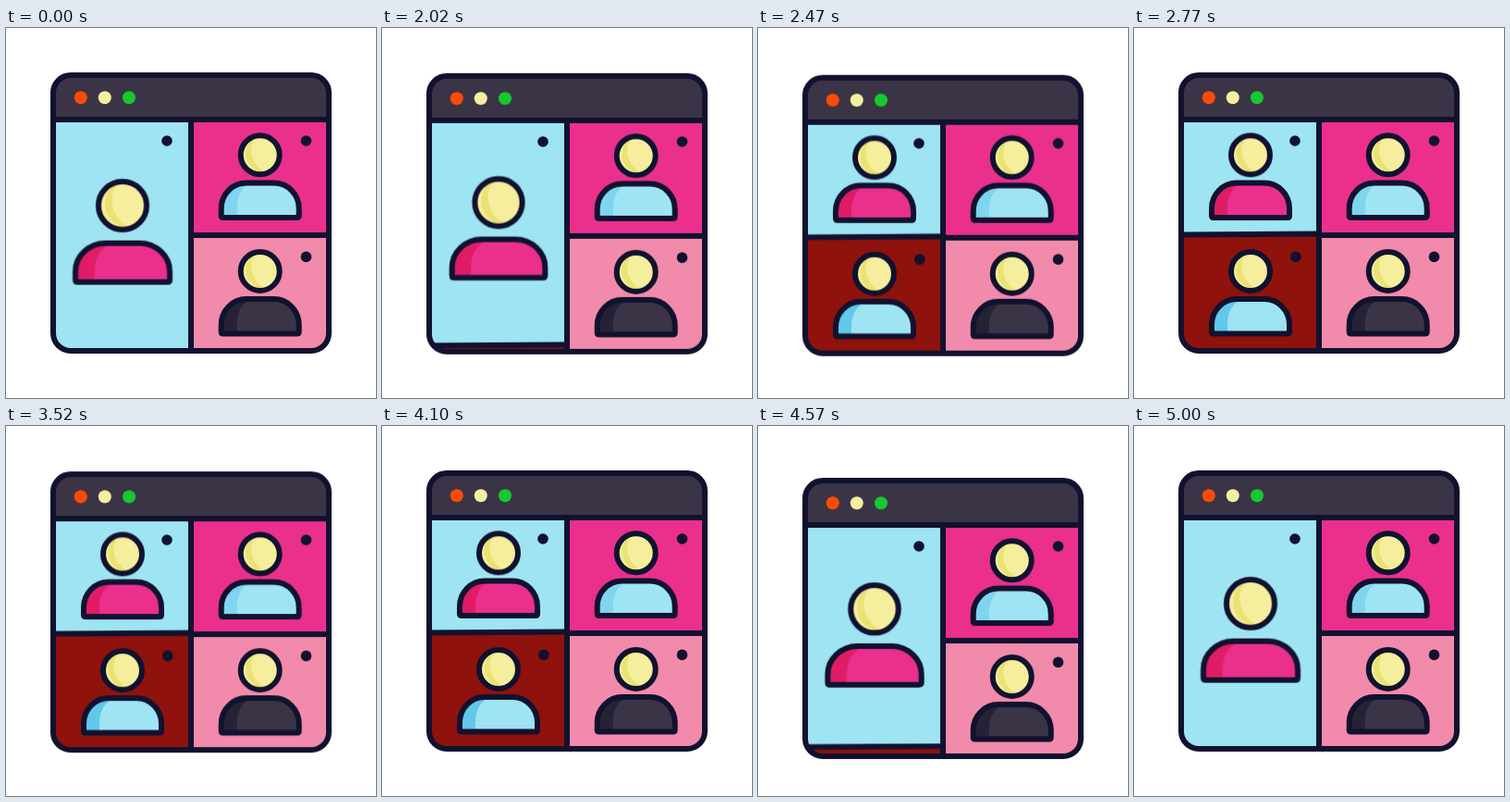
Write an HTML page that moves like this. It is 400x400 px and loops after 5020 ms.

```html
<!DOCTYPE html>
<html lang="en">
<head>
<meta charset="utf-8">
<title>Video call</title>
<style>
  html, body { margin: 0; width: 100%; height: 100%; overflow: hidden; background: #fff; }
  svg { display: block; width: 100vw; height: 100vh; }

  .line { fill: none; stroke: #10122f; stroke-width: 6; stroke-linecap: round; stroke-linejoin: round; vector-effect: non-scaling-stroke; }
  .cam { fill: #10122f; }
  .top { --c: #ea2f8c; --s: #e01c66; }
  .sky { --c: #9ee4f3; --s: #7fd5f0; }
  .low { --c: #9ee4f3; --s: #62c8ea; }
  .ink { --c: #3a3446; --s: #252236; }

  .window { animation: bob 5020ms infinite; }
  .move { animation: swap 5020ms infinite; }
  .slide { animation: slide 5020ms infinite; }
  .head { --off: translate(126px, 192px) scale(1.24); --on: translate(126px, 137.3px) scale(1); }
  .body { --off: translate(126px, 274.5px) scale(1.215, 1.12); --on: translate(126px, 205px) scale(1); }
  .panel { --off: translateY(129px); --on: translateY(0); }
  .guest { --off: translateY(160px); --on: translateY(0); }

  /* dip and return, a faint bob, then the dip again */
  @keyframes bob {
    0%, 39.84%, 84.26% { transform: translateY(0); animation-timing-function: cubic-bezier(.3, .1, .4, 1); }
    44.22%, 88.65% { transform: translateY(13px); animation-timing-function: cubic-bezier(.25, .1, .2, 1); }
    54.98%, 57.77% { transform: translateY(0); animation-timing-function: ease-in; }
    68.13% { transform: translateY(.6px); animation-timing-function: ease-in-out; }
    73.5% { transform: translateY(2.6px); animation-timing-function: ease-in-out; }
    81.67% { transform: translateY(0); }
    99.4%, 100% { transform: translateY(0); }
  }
  @keyframes swap {
    0%, 39.84% { transform: var(--off); animation-timing-function: cubic-bezier(.25, .4, .2, 1); }
    49.4%, 84.26% { transform: var(--on); animation-timing-function: cubic-bezier(.25, .4, .2, 1); }
    94.22%, 100% { transform: var(--off); }
  }
  @keyframes slide {
    0%, 39.84% { transform: var(--off); animation-timing-function: cubic-bezier(.25, .4, .2, 1); }
    49.4%, 84.26% { transform: var(--on); animation-timing-function: cubic-bezier(.25, .4, .2, 1); }
    97%, 100% { transform: var(--off); }
  }
</style>
</head>
<body>
<svg viewBox="0 0 400 400">
  <defs>
    <clipPath id="frame"><rect x="51" y="51" width="298" height="298" rx="19"/></clipPath>
    <g id="head">
      <circle r="21" fill="#f5ee9c"/>
      <path d="M-2-21A21 21 0 0 0 8 19.4C-9 14-16-10-2-21Z" fill="#eae272"/>
      <circle r="21" class="line"/>
    </g>
    <path id="bust" d="M-42-2V-10C-42-25-30-37.5-15-37.5H15C30-37.5 42-25 42-10V-2Q42 0 40 0H-40Q-42 0-42-2Z"/>
    <g id="body">
      <use href="#bust" style="fill: var(--c)"/>
      <path d="M-41 0L-42-2V-10C-42-25-30-37.5-15-37.5H-9C-20-33-25-23-25-10V0Z" style="fill: var(--s)"/>
      <path class="line" d="M-42-2V-10C-42-25-30-37.5-15-37.5H15C30-37.5 42-25 42-10V-2Q42 0 40 0H-40Q-42 0-42-2Z"/>
    </g>
    <g id="person">
      <use href="#head" y="137.3"/>
      <use href="#body" y="205"/>
    </g>
  </defs>

  <g class="window">
    <g clip-path="url(#frame)">
      <path d="M51 51H349V99H51Z" fill="#3a3446"/>
      <path d="M51 99H200V349H51Z" fill="#9ee4f3"/>
      <circle class="cam" cx="174" cy="122" r="5.8"/>
      <g class="top">
        <use href="#head" class="move head"/>
        <use href="#body" class="move body"/>
      </g>

      <g class="slide panel">
        <path d="M51 223H200V360H51Z" fill="#8f120c"/>
        <path class="line" d="M51 223.6L200 222.6"/>
      </g>
      <g class="slide guest low">
        <circle class="cam" cx="174.8" cy="247.4" r="5.8"/>
        <use href="#person" x="126" y="125.6"/>
      </g>

      <path d="M200 99H349V224H200Z" fill="#ea2f8c"/>
      <path d="M200 224H349V349H200Z" fill="#f28aab"/>
      <circle class="cam" cx="324.5" cy="122" r="5.8"/>
      <circle class="cam" cx="324.5" cy="247.4" r="5.8"/>
      <use href="#person" class="sky" x="274.7"/>
      <use href="#person" class="ink" x="274.7" y="125.6"/>
    </g>

    <circle cx="80.8" cy="75.3" r="7" fill="#ff4b00"/>
    <circle cx="106.8" cy="75.3" r="7" fill="#f6efa0"/>
    <circle cx="133" cy="75.3" r="7" fill="#18c82f"/>
    <path class="line" d="M51 99H349M200 99V349M200 224H349"/>
    <rect class="line" x="51" y="51" width="298" height="298" rx="19"/>
  </g>
</svg>
</body>
</html>
```
